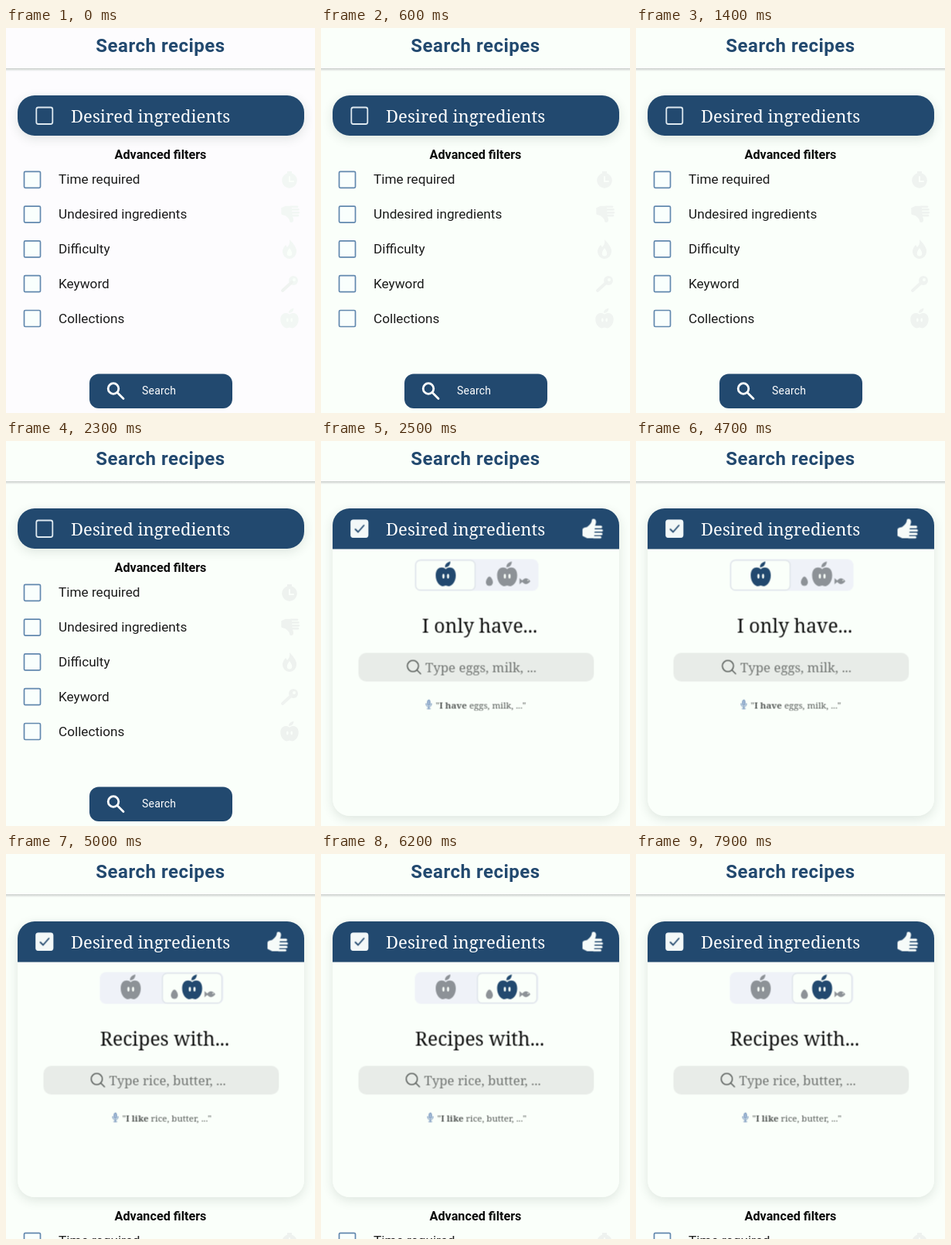
An HTML page that plays this animation: 400 by 497 pixels, repeating every 8 s.

```html
<!DOCTYPE html>
<html lang="en">
<head>
<meta charset="utf-8">
<title>Search recipes</title>
<style>
  html, body { margin: 0; width: 100%; height: 100%; overflow: hidden; }
  body { position: relative; background: #fafffa; font-family: Roboto, sans-serif; }
  svg { position: absolute; left: 0; top: 0; display: block; }
  #card {
    position: absolute; left: 14.5px; top: 86.5px; width: 371px; height: 52px;
    border-radius: 22px; overflow: hidden;
    box-shadow: 0 4px 14px rgba(40, 60, 50, .13);
  }
  .slab { font-family: "Noto Serif", serif; }
  .mid { text-anchor: middle; }
  .title { font-size: 24px; font-weight: 600; letter-spacing: .5px; fill: #22496f; }
  .sub { font-size: 16.2px; font-weight: 600; fill: #0b0b0b; }
  .row { font-size: 17.2px; fill: #1b1b1b; }
  .ask { font-size: 24.7px; fill: #111; }
  .hint { font-size: 16.8px; fill: #727673; }
  .say { font-size: 11.5px; fill: #565a58; }
  .say tspan { font-weight: 700; }
  .navy { fill: #22496f; }
  .gray { fill: #8d9297; }
  .line { fill: none; stroke-linecap: round; }
</style>
</head>
<body>
<svg width="0" height="0">
  <defs>
    <g id="apple">
      <path d="M0-9C-4-13-13-12-13-1C-13 8-7 13-4 13C-2 13-1 12 0 12C1 12 2 13 4 13C7 13 13 8 13-1C13-12 4-13 0-9ZM-1-11.5C-1-16 2-18 6-19C6-14 3-11.5-1-11.5Z"/>
      <ellipse cx="-3" rx="1.4" ry="3.1" fill="#fafffa"/>
      <ellipse cx="3" rx="1.4" ry="3.1" fill="#fafffa"/>
    </g>
    <g id="thumb">
      <path d="M-13 1Q-13-1-11-1.5L-7-2.5Q-1-7-1-11Q-1-13 1-13Q5-13 4.5-8L3-3L2 12H-7L-13 9Z"/>
      <rect x="0" y="-4.2" width="12.5" height="3.2" rx="1.6"/>
      <rect x="0" y=".4" width="13.5" height="3.2" rx="1.6"/>
      <rect x="0" y="4.9" width="13" height="3.2" rx="1.6"/>
      <rect x="0" y="9.3" width="11.5" height="3" rx="1.5"/>
    </g>
    <g id="side">
      <path d="M0-6C2-6 4.5-1.5 4.5 1.5A4.5 4.5 0 0 1-4.5 1.5C-4.5-1.5-2-6 0-6Z" transform="translate(-23 6.5)"/>
      <path d="M16 2.5L20.500 6.500L16 10.500ZM19 6.500Q24-1 30 6.500Q24 14 19 6.500Z"/>
      <circle cx="27" cy="5.5" r=".8" fill="#fafffa"/>
    </g>
    <g id="lens" class="line">
      <circle cx="118.500" cy="290" r="7.2"/><path d="M124 295.500L128.500 300"/>
    </g>
    <g id="mic" class="line" stroke="#6487b3">
      <rect x="-1.6" y="-6" width="3.2" height="7" rx="1.6" fill="#a9bfda"/>
      <path d="M-3.5-1.5Q-3.5 2.8 0 2.8Q3.5 2.8 3.5-1.5M0 3V5M-2 5H2"/>
    </g>
  </defs>
</svg>

<svg id="filters" width="400" height="497">
  <text class="sub mid" x="200" y="169">Advanced filters</text>
  <g id="rows"></g>
  <g id="faint" fill="#eff3f0">
    <path d="M364 185h6v2.5a9.8 9.8 0 1 1-6 0Z"/>
    <path d="M367 192v6h5" class="line" stroke="#fafffa" stroke-width="2"/>
    <use href="#thumb" transform="translate(368 240) scale(.9 -.85)"/>
    <path d="M367 273Q377 283 376 289A9 9 0 0 1 358 289Q358 284 362 280L364 283Q368 279 367 273Z"/>
    <path d="M367 284q4 5 3 9q-3 3-6 0q-1-4 3-9" fill="#fafffa"/>
    <circle cx="372" cy="326" r="6"/>
    <path d="M370 328L358 339" class="line" stroke="#eff3f0" stroke-width="4"/>
    <circle cx="373" cy="325" r="2" fill="#fafffa"/>
    <use href="#apple" transform="translate(367 377) scale(.9 .8)"/>
  </g>
  <rect class="navy" x="108" y="446.500" width="185" height="44.500" rx="12"/>
  <g class="line" stroke="#fff" stroke-width="2.8">
    <circle cx="139" cy="465.5" r="6.8"/><path d="M144.5 471L152 478.5"/>
  </g>
  <text x="176" y="473" font-size="14" letter-spacing=".2" fill="#fff">Search</text>
</svg>

<div id="card">
  <svg width="371" height="410" viewBox="14.5 86.5 371 410">
    <rect x="14" y="86" width="373" height="412" fill="#fafffa"/>
    <g id="panel">
      <rect x="121" y="152" width="160" height="41" rx="8" fill="#eff2f8"/>
      <rect id="pill" x="122" y="153.5" width="77" height="38.5" rx="6" fill="#fafffa" stroke="#e0e5ea" stroke-width="1.5"/>
      <use id="one" href="#apple" x="161" y="174"/>
      <use id="many" href="#apple" x="240.500" y="174"/>
      <use class="gray" href="#side" x="240.500" y="174"/>
      <rect x="48" y="273" width="305" height="37" rx="10" fill="#e8ece8"/>
      <g id="only"></g>
      <g id="with"></g>
    </g>
    <rect class="navy" x="14" y="86" width="373" height="53"/>
    <text class="slab" x="83.500" y="121.500" font-size="22.1" fill="#fff">Desired ingredients</text>
    <rect x="38.800" y="102" width="21" height="21.500" rx="2.500" fill="none" stroke="#dde8ef" stroke-width="1.8"/>
    <g id="ticked">
      <rect x="38" y="101.500" width="22.500" height="22.500" rx="3" fill="#f3f8f8"/>
      <path class="line" d="M44 113.500L47.500 117L55 108.500" stroke="#22496f" stroke-width="1.8"/>
      <use href="#thumb" x="351" y="113" fill="#f6fbf9"/>
    </g>
  </svg>
</div>

<svg width="400" height="70">
  <defs>
    <linearGradient id="shade" x2="0" y2="1">
      <stop stop-color="#c4c8c6"/><stop offset=".35" stop-color="#dde1de"/>
      <stop offset="1" stop-color="#dde1de" stop-opacity="0"/>
    </linearGradient>
  </defs>
  <rect id="bar" width="400" height="52" fill="#fafffa"/>
  <rect y="52" width="400" height="4" fill="url(#shade)"/>
  <text class="title mid" x="200" y="30.500">Search recipes</text>
</svg>

<script>
const LOOP = 8000;
const $ = id => document.getElementById(id);

const labels = ["Time required", "Undesired ingredients", "Difficulty", "Keyword", "Collections"];
$("rows").innerHTML = labels.map((label, i) => {
  const y = 196 + i * 44.8;
  return `<rect x="23.5" y="${y - 10.7}" width="21" height="21" rx="1.5" fill="#f9fffd" stroke="#6288ae" stroke-width="1.7"/>
    <text class="row" x="68" y="${y + 5.3}">${label}</text>`;
}).join("");

const prompt = (title, foods, verb, lensX, textX, micX) => `
  <text class="slab ask mid" x="205" y="246.500">${title}...</text>
  <use href="#lens" x="${lensX}" stroke="#5f6461" stroke-width="1.6"/>
  <text class="slab hint" x="${textX}" y="298">Type ${foods}, ...</text>
  <use href="#mic" x="${micX}" y="340"/>
  <text class="slab say" x="${micX + 9}" y="345">"<tspan>I ${verb}</tspan> ${foods}, ..."</text>`;
$("only").innerHTML = prompt("I only have", "eggs, milk", "have", 0, 134.5, 139);
$("with").innerHTML = prompt("Recipes with", "rice, butter", "like", -1.5, 133, 141);

// Each step is [time in ms, value]; values hold to the end of the loop.
function play(id, prop, steps) {
  const last = steps[steps.length - 1][1];
  const frames = [[0, steps[0][1]], ...steps, [LOOP, last]];
  const el = id ? $(id) : document.body;
  el.animate(frames.map(([time, value]) => ({ offset: time / LOOP, [prop]: value })),
    { duration: LOOP, iterations: Infinity });
}
const jump = (time, from, to) => [[time, from], [time, to]];

const OPEN = [2350, 2470], SWITCH = [4750, 4870], TOGGLE = 4790;
const sizes = (a, b, c) => [[OPEN[0], a], [OPEN[1], b], [SWITCH[0], b], [SWITCH[1], c]];

play("card", "height", sizes("52px", "397px", "356px"));
play("filters", "transform", sizes(0, 345, 304).map(([t, y]) => [t, `translateY(${y}px)`]));
play("panel", "opacity", [[OPEN[0], 0], [OPEN[1], 1]]);
play("ticked", "opacity", jump(2390, 0, 1));
play("only", "opacity", jump(TOGGLE, 1, 0));
play("with", "opacity", jump(TOGGLE, 0, 1));
play("pill", "transform", jump(TOGGLE, "translateX(0px)", "translateX(80px)"));
play("one", "fill", jump(TOGGLE, "#22496f", "#8d9297"));
play("many", "fill", jump(TOGGLE, "#8d9297", "#22496f"));
play("faint", "fill", [[0, "#f2f7f4"], [600, "#f0f4f1"], [2000, "#eef2ef"]]);
play("", "backgroundColor", [[0, "#fdfcfe"], [500, "#fafffa"]]);
play("bar", "fill", [[0, "#fdfcfe"], [500, "#fafffa"]]);
</script>
</body>
</html>
```
